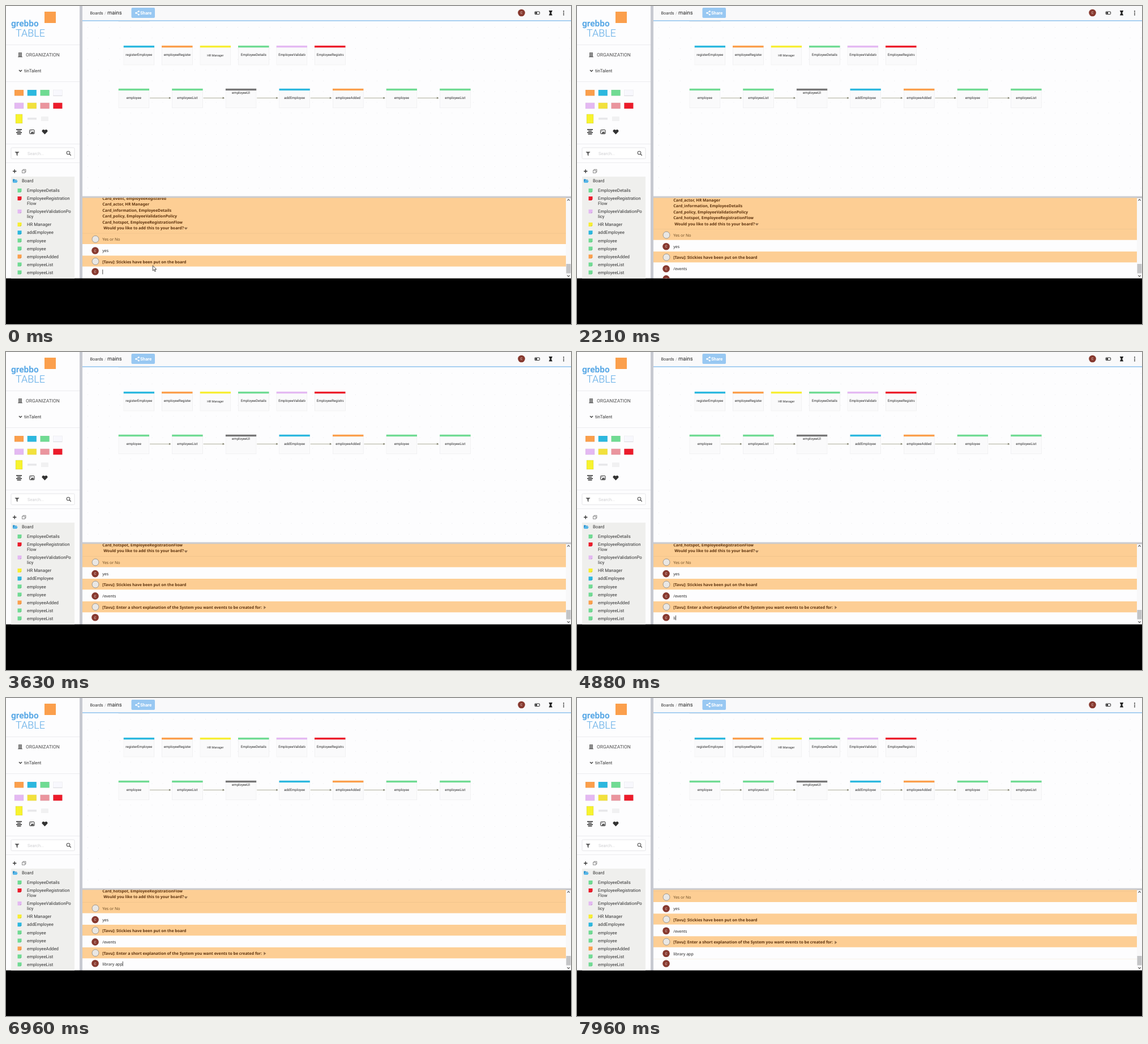
Animation, 998 px wide and 561 px high, one loop 8000 ms. Source, as an HTML page:

```html
<!DOCTYPE html>
<html lang="en">
<head>
<meta charset="utf-8">
<title>Board chat</title>
<style>
  html, body { margin: 0; width: 100%; height: 100%; overflow: hidden; background: #000; }
  svg { display: block; width: 998px; height: 561px; }
  text { font-family: Roboto, sans-serif; text-rendering: geometricPrecision; white-space: pre; }
  .chat text { font-family: "Noto Sans", sans-serif; font-size: 7px; }
  .chat .bold { font-weight: 700; font-size: 6.93px; fill: #5b310c; }
  .chat .initial, .initial { font-family: Roboto, sans-serif; font-size: 6px; fill: #f3dcd8; text-anchor: middle; }
</style>
</head>
<body>
<svg id="stage" viewBox="0 0 998 561"></svg>
<script>
const LOOP = 8000;
const C = {
  green: '#70db93', blue: '#2cb8df', orange: '#fb9f4c', yellow: '#f7ee33', purple: '#e4b9f2',
  red: '#ec1c2b', gray: '#777', band: '#fdce94', page: '#fdfdfe', sky: '#5aa9e6', ink: '#333', user: '#87392f'
};

const rect = (x, y, w, h, fill, extra = '') =>
  `<rect x="${x}" y="${y}" width="${w}" height="${h}" fill="${fill}" ${extra}/>`;
const text = (x, y, s, size, fill = C.ink, extra = '') =>
  `<text x="${x}" y="${y}" font-size="${size}" fill="${fill}" ${extra}>${s}</text>`;
const path = (d, fill = C.ink, extra = '') => `<path d="${d}" fill="${fill}" ${extra}/>`;
const stroke = (d, color = C.ink, width = 1) => path(d, 'none', `stroke="${color}" stroke-width="${width}"`);
const circle = (x, y, r, fill, extra = '') => `<circle cx="${x}" cy="${y}" r="${r}" fill="${fill}" ${extra}/>`;
const user = (x, y) => circle(x, y, 6.3, C.user) + `<text class="initial" x="${x}" y="${y + 2.2}">C</text>`;

function sidebar() {
  let out = rect(0, 0, 130, 480.5, C.page) + rect(130, 0, 5, 480.5, '#c7c9d1');
  out += text(9, 35.5, 'grebbo', 15.4, C.sky, 'font-weight="700"');
  out += text(17, 54, 'TABLE', 18, C.sky, 'font-weight="300"');
  out += rect(68, 10, 20, 20, C.orange);
  for (const y of [68, 133, 243, 276]) out += rect(0, y, 130, 0.8, '#e9e9ec');

  // Organisation
  out += rect(22, 82, 6, 8, '#666') + rect(21, 89.3, 8, 1, '#666');
  for (const y of [83.2, 85.2, 87.2]) out += rect(23.2, y, 1.2, 1, '#fff') + rect(25.6, y, 1.2, 1, '#fff');
  out += text(35, 89, 'ORGANIZATION', 8.45, '#505050');
  out += stroke('M23 113l2.5 2.4 2.5-2.4', C.ink, 1.4) + text(32, 117, 'tinTalent', 7.85);

  // Sticky palette
  const swatches = [
    [C.orange, C.blue, C.green, '#f8f8fd'],
    [C.purple, '#f2e13d', '#ea959e', C.red]
  ];
  swatches.forEach((row, r) => row.forEach((color, i) => {
    out += rect(15 + i * 22.8, 148 + r * 22.8, 16, 10.3, color, 'stroke="#0001" stroke-width=".6"');
  }));
  out += rect(83.4, 157.8, 16, 0.8, '#d4d4d8');
  out += rect(17, 191, 12, 16, '#f7f32e', 'stroke="#0002" stroke-width=".6"');
  out += rect(38, 197, 16, 3.6, '#e8e8ea') + rect(62, 195, 13, 8, '#f1f1f2');

  // Tools
  out += stroke('M18 218h10M20 220.6h6M18 223.2h10M19.5 225.8h7', '#222', 1.4);
  out += rect(41.5, 218.5, 8.6, 7, 'none', `stroke="${C.ink}" rx="1"`);
  out += path('M43 224.5l2-2.5 1 1 1.6-2 1.8 3.5z') + circle(43.8, 220.6, 0.8, C.ink);
  out += path('M68.5 226.5l-4.4-4.4c-2-2.6 1.6-6 4.4-3 2.8-3 6.4.4 4.4 3z');

  // Search
  out += rect(9, 250, 112, 19.5, '#fff', 'stroke="#dfdfe3" stroke-width=".8" rx="1.5"');
  out += path('M15.5 257h8l-3 3.6v4l-2-1.5v-2.5z', '#666');
  out += text(38, 262.6, 'Search...', 7.5, '#cfcfd2');
  out += circle(110, 259, 2.8, 'none', 'stroke="#555" stroke-width="1.1"') + stroke('M112 261l2.8 2.8', '#555', 1.3);

  // Tree
  out += stroke('M12 291.5h6.4M15.2 288.3v6.4', C.ink, 1.3);
  out += rect(28.5, 290, 5, 4.5, 'none', 'stroke="#777" stroke-width=".8"') + stroke('M30 290v-1.7h5v4.7h-1.5', '#777', 0.8);
  out += rect(9, 301, 112, 179.5, '#efefed');
  out += path('M12 311.5v-6h3l1 1h3.2v1.3h-4.7z', '#2692d0') + path('M12.2 311.7l2-3.4h6.6l-1.7 3.4z', '#49b2e8');
  out += text(28, 310.8, 'Board', 7.8);
  const items = [
    [325.5, C.green, 'EmployeeDetails'], [339.5, C.red, 'EmployeeRegistration', 'Flow'],
    [362.5, C.purple, 'EmployeeValidationPo', 'licy'], [385.5, C.yellow, 'HR Manager'],
    [399.7, C.blue, 'addEmployee'], [413.8, C.green, 'employee'], [428, C.green, 'employee'],
    [442, C.orange, 'employeeAdded'], [456, C.green, 'employeeList'], [470, C.green, 'employeeList']
  ];
  for (const [y, color, label, more] of items) {
    out += path(`M20.5 ${y - 3.5}h7v5l-2 2h-5z`, color) + path(`M25.5 ${y + 3.5}v-2h2z`, '#0003');
    out += text(37, y + 2.7, label, 7.8);
    if (more) out += text(37, y + 11.7, more, 7.8);
  }
  return out;
}

function header() {
  let out = rect(135, 0, 863, 25.5, '#f9f9fa') + rect(135, 25, 863, 2, '#a9d0f1');
  out += text(148.5, 15, 'Boards', 7.35) + text(174, 15, '/', 7, '#aaa') + text(179, 15.4, 'mains', 9.35, '#222');
  out += rect(221.5, 3, 41.5, 18, '#98c8f2', 'rx="2"');
  out += stroke('M234.5 9.5l-5 2.7 5 2.7', '#fff', 1);
  for (const [x, y] of [[229.7, 12.2], [234.3, 9.5], [234.3, 15]]) out += circle(x, y, 1.5, '#fff');
  out += text(237, 15, 'Share', 7.8, '#fff', 'font-weight="700"');
  out += user(910.5, 12);
  out += rect(934, 10, 8.6, 4.6, 'none', 'stroke="#222" stroke-width="1" rx="1"') + rect(935, 11, 3, 2.6, '#222');
  out += path('M959 8h6v1.2h-.6c0 1.7-.8 2.4-1.7 3.1.9.7 1.7 1.4 1.7 3.1h.6v1.2h-6v-1.2h.6c0-1.7.8-2.4 1.7-3.1-.9-.7-1.7-1.4-1.7-3.1h-.6z', '#222');
  for (const y of [9.2, 12.4, 15.6]) out += circle(985, y, 1, '#222');
  return out;
}

function card(x, y, color, label, { size = 6.1, dy = 18.4, clipped = false } = {}) {
  const labelX = clipped ? 3.8 : 27.3;
  return `<svg x="${x}" y="${y}" width="55" height="35">` +
    rect(0.3, 0.3, 54, 34, '#fafafb', 'stroke="#e9e9ec" stroke-width=".6"') + rect(0, 0, 54.5, 3.6, color) +
    `<svg x="3.5" width="47.8" height="35">` +
    text(labelX - 3.5, dy, label, size, '#2c2c2c', clipped ? '' : 'text-anchor="middle"') + '</svg></svg>';
}

function board() {
  let out = rect(135, 27, 863, 309, C.page) + rect(135, 27, 863, 309, 'url(#dots)');
  out += rect(198.5, 27, 55, 1, '#ececef');
  const top = [
    [C.blue, 'registerEmployee'], [C.orange, 'employeeRegistered', { clipped: true }],
    [C.yellow, 'HR Manager', { size: 5.3, dy: 19.2 }], [C.green, 'EmployeeDetails'],
    [C.purple, 'EmployeeValidationPolicy', { clipped: true }], [C.red, 'EmployeeRegistrationFlow', { clipped: true }]
  ];
  top.forEach(([color, label, options], i) => out += card(207.5 + i * 67.5, 69.7, color, label, options));
  const flow = [
    [C.green, 'employee'], [C.green, 'employeeList'], [C.gray, 'employeeUI', { dy: 9 }], [C.blue, 'addEmployee'],
    [C.orange, 'employeeAdded'], [C.green, 'employee'], [C.green, 'employeeList']
  ];
  flow.forEach(([color, label, options], i) => {
    const x = 198.5 + i * 94.6;
    out += card(x, 145.5, color, label, options);
    if (i < flow.length - 1) {
      out += stroke(`M${x + 55.5} 162.3h36`, '#9a9a80', 0.8) + path(`M${x + 93} 162.3l-4-1.8 1.2 1.8-1.2 1.8z`, '#66664e');
    }
  });
  return out;
}

// Chat rows are laid out in scroll coordinates; y is the middle of the line.
const bot = y => circle(158, y - 0.5, 6, '#e9e7e4', 'stroke="#8d8780" stroke-width=".8"');
const bold = (x, y, s) => `<text class="bold" x="${x}" y="${y + 2.5}">${s}</text>`;
const plain = (y, s, fill = '#222') => text(170.3, y + 2.5, s, 7, fill);
const band = (y, h) => rect(135, y, 854, h, C.band);

function history() {
  let out = band(300, 120) + rect(135, 400.6, 854, 0.8, '#f0c48d') + band(440.4, 19.2);
  ['Card_event, employeeRegistered', 'Card_actor, HR Manager', 'Card_information, EmployeeDetails',
    'Card_policy, EmployeeValidationPolicy', 'Card_hotspot, EmployeeRegistrationFlow']
    .forEach((line, i) => out += bold(170.3, 339.4 + i * 10.4, line));
  out += bold(172.3, 391.4, 'Would you like to add this to your board?') + path('M314.5 390.7h6.5l-3.2 4z', '#94704c');
  out += bot(411.8) + plain(411.8, 'Yes or No', '#705027');
  out += user(157.5, 431.5) + plain(431.8, 'yes');
  out += bot(451) + bold(170.3, 451.2, '[Tavu]: Stickies have been put on the board');
  return out;
}

function frame() {
  return rect(135, 335.5, 863, 2.8, '#cbccd1') + rect(989, 338.3, 9, 142.2, '#f8f8f9') +
    rect(989.5, 455, 8, 16.5, '#c3c4c6') +
    stroke('M991.4 343.3l2.2-2.2 2.2 2.2M991.4 475.2l2.2 2.2 2.2-2.2', '#555', 1.1);
}

const stage = document.getElementById('stage');
stage.innerHTML = `
  <defs>
    <pattern id="dots" x="144" y="37" width="18.92" height="18.92" patternUnits="userSpaceOnUse">${rect(0, 0, 1, 1, '#e9e9ec')}</pattern>
    <clipPath id="chatClip">${rect(135, 338.3, 854, 142.2, '#fff')}</clipPath>
  </defs>
  ${sidebar()}${header()}${board()}
  <g class="chat" clip-path="url(#chatClip)">
    ${rect(135, 338, 854, 143, C.page)}
    <g id="scroll">
      ${history()}
      <g id="command">${user(157.5, 470.8)}${plain(471, '/events')}</g>
      <g id="reply">${band(480.3, 19.4)}${bot(490.6)}
        ${bold(170.3, 490.8, '[Tavu]: Enter a short explanation of the System you want events to be created for:')}
        ${path('M455.3 488.2v6l4-3z', '#94704c')}</g>
      <g id="answer">${user(157.5, 510.8)}${plain(511.5, 'library app')}${rect(135, 520.4, 854, 0.6, '#f3ead9')}</g>
      <g id="input">${user(157.5, 0)}<text id="typed" x="170.3" y="3.4" fill="#222"></text>${rect(0, -3.6, 0.8, 8.4, '#222', 'id="caret"')}</g>
    </g>
  </g>
  ${frame()}
  <path id="pointer" d="M259.3 457.8v9.2l2.1-1.9 1.5 3.3 1.4-.6-1.5-3.3h2.9z" fill="#fff" stroke="#222" stroke-width=".8"/>`;

const el = id => document.getElementById(id);
const show = (id, on) => el(id).setAttribute('visibility', on ? 'visible' : 'hidden');
const ramp = (t, from, to) => {
  const p = Math.min(1, Math.max(0, (t - from) / (to - from)));
  return p * p * (3 - 2 * p);
};

const ENTER = 2130, REPLY = 2380, READY = 2700, ANSWER = 7530, BLINK = 530;
const entries = [
  { word: '/events', start: 500, step: 130, until: ENTER },
  { word: 'library app', start: 4650, step: 190, until: ANSWER }
];

function draw(t) {
  const scroll = 20.2 * ramp(t, ENTER, 2330) + 20.2 * ramp(t, REPLY, 2560) + 19.6 * ramp(t, ANSWER, 7730);
  el('scroll').setAttribute('transform', `translate(0 ${-scroll})`);
  show('command', t >= ENTER);
  show('reply', t >= REPLY);
  show('answer', t >= ANSWER);
  show('pointer', t < entries[0].start);

  const inputY = t < ENTER ? 468.5 : t < REPLY ? 488.6 : t < ANSWER ? 508.7 : 528.5;
  el('input').setAttribute('transform', `translate(0 ${inputY})`);

  let typed = '', lastKey = t < ENTER ? 0 : READY;
  for (const { word, start, step, until } of entries) {
    if (t < start || t >= until) continue;
    const count = Math.min(word.length, 1 + Math.floor((t - start) / step));
    typed = word.slice(0, count);
    lastKey = start + (count - 1) * step;
  }
  el('typed').textContent = typed;
  const focused = t < ENTER || (t >= READY && t < ANSWER);
  show('caret', focused && Math.floor((t - lastKey) / BLINK) % 2 === 0);
  el('caret').setAttribute('x', 170.4 + (typed ? el('typed').getComputedTextLength() : 0));
}

function tick() {
  draw(performance.now() % LOOP);
  requestAnimationFrame(tick);
}
tick();
</script>
</body>
</html>
```
